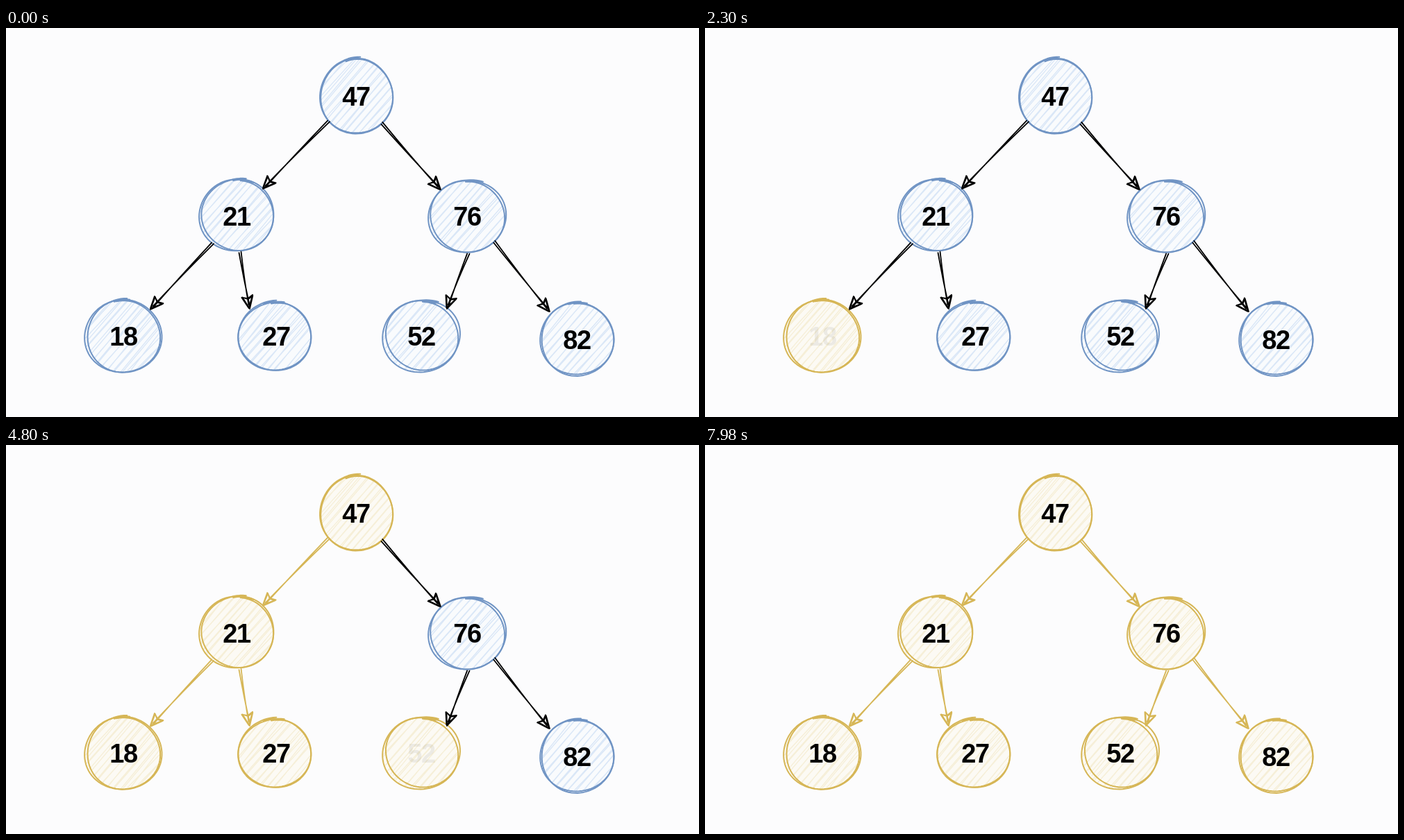
An HTML page with a canvas that plays this animation: 998 px wide and 561 px high, repeating every 8000 ms.

```html
<!DOCTYPE html>
<html lang="en">
<head>
<meta charset="utf-8">
<title>In-order tree traversal</title>
<style>
  html, body { margin: 0; width: 100%; height: 100%; overflow: hidden; background: #fcfcfd; }
  canvas { display: block; }
</style>
</head>
<body>
<canvas id="stage" width="998" height="561"></canvas>
<script>
const ctx = document.getElementById('stage').getContext('2d');
const LOOP = 8000, LABEL_FADE = 500;
const BLUE = { line: '#7094c4', hatch: '#dae7f7', tint: '#f9fbfd' };
const GOLD = { line: '#d6b656', hatch: '#f6efd8', tint: '#fcfaf4' };

// label position, two pen loops as [left, top, right, bottom], visit time
const nodes = [
  { label: '47', x: 504, y: 98, loops: [[452, 44, 557, 152], [453, 45, 557, 153]], at: 4125 },
  { label: '21', x: 332, y: 271, loops: [[278, 219, 385, 322], [282, 218, 386, 321]], at: 2875 },
  { label: '76', x: 664, y: 271, loops: [[608, 221, 718, 324], [611, 219, 720, 323]], at: 5375 },
  { label: '18', x: 169, y: 444, loops: [[113, 393, 222, 497], [117, 392, 224, 497]], at: 2250 },
  { label: '27', x: 389, y: 444, loops: [[334, 395, 439, 494], [335, 396, 440, 494]], at: 3500 },
  { label: '52', x: 598, y: 444, loops: [[542, 394, 651, 497], [547, 392, 654, 493]], at: 4750 },
  { label: '82', x: 822, y: 449, loops: [[769, 397, 875, 500], [771, 396, 875, 502]], at: 6000 }
];
const edges = [
  { from: [465, 134], to: [370, 232], at: 4125 },
  { from: [541, 137], to: [626, 233], at: 7250 },
  { from: [298, 310], to: [208, 406], at: 2875 },
  { from: [337, 323], to: [351, 405], at: 4000 },
  { from: [666, 325], to: [635, 405], at: 5375 },
  { from: [703, 308], to: [783, 409], at: 6500 }
];

function seeded(seed) {
  return () => {
    seed = (seed * 16807) % 2147483647;
    return seed / 2147483647;
  };
}

// A hand-drawn ellipse whose ends overlap near the top.
function penLoop([left, top, right, bottom], random) {
  const path = new Path2D();
  const cx = (left + right) / 2, cy = (top + bottom) / 2;
  const phase = random() * 6, start = -1.9 + random() * 0.5, sweep = 2 * Math.PI + 0.35;
  for (let i = 0; i <= 80; i++) {
    const u = i / 80, a = start + sweep * u;
    const drift = 0.035 * Math.max(0, (u - 0.93) / 0.07) - 0.025 * Math.max(0, 1 - u / 0.07);
    const r = 1 + drift + 0.012 * Math.sin(3 * a + phase);
    path.lineTo(cx + (right - left) / 2 * r * Math.cos(a), cy + (bottom - top) / 2 * r * Math.sin(a));
  }
  return path;
}

function hatching(node, random) {
  const path = new Path2D();
  const dx = Math.cos(0.855), dy = -Math.sin(0.855);
  const jitter = () => (random() - 0.5) * 5;
  for (let offset = -54; offset <= 54; offset += 8.5) {
    const half = Math.sqrt(Math.max(0, 54 * 54 - offset * offset));
    const cx = node.x - dy * offset, cy = node.y + dx * offset;
    for (let pass = 0; pass < 2; pass++) {
      path.moveTo(cx - dx * half + jitter(), cy - dy * half + jitter());
      path.lineTo(cx + dx * half + jitter(), cy + dy * half + jitter());
    }
  }
  return path;
}

function arrow({ from: [x1, y1], to: [x2, y2] }) {
  const path = new Path2D();
  const length = Math.hypot(x2 - x1, y2 - y1);
  const ux = (x2 - x1) / length, uy = (y2 - y1) / length;
  const at = (back, side) => [x2 - ux * back - uy * side, y2 - uy * back + ux * side];
  const bend = (start, middle, end) => {
    path.moveTo(...start);
    path.quadraticCurveTo(...middle, ...end);
  };
  bend(at(length, -1.6), at(length * 0.5, 0.8), at(6, 0.6));
  bend(at(length - 1, 1.6), at(length * 0.5, 1.2), at(6, -0.6));
  for (const wobble of [0, 1.2]) {
    path.moveTo(...at(wobble, wobble));
    path.lineTo(...at(18, 7.5 + wobble));
    path.lineTo(...at(14 + wobble, 0));
    path.lineTo(...at(18 + wobble, -7.5));
    path.closePath();
  }
  return path;
}

nodes.forEach((node, i) => {
  const random = seeded(971 * (i + 3));
  node.outlines = node.loops.map(loop => penLoop(loop, random));
  node.hatch = hatching(node, random);
});
edges.forEach(edge => edge.path = arrow(edge));

function drawNode(node, time) {
  const visited = time >= node.at;
  const color = visited ? GOLD : BLUE;
  ctx.save();
  ctx.clip(node.outlines[0]);
  ctx.fillStyle = color.tint;
  ctx.fill(node.outlines[0]);
  ctx.strokeStyle = color.hatch;
  ctx.lineWidth = 1.4;
  ctx.stroke(node.hatch);
  ctx.restore();

  ctx.strokeStyle = color.line;
  ctx.lineWidth = 2;
  node.outlines.forEach(outline => ctx.stroke(outline));

  ctx.globalAlpha = visited ? Math.min(1, 0.6 * (time - node.at) / LABEL_FADE) : 1;
  if (time - node.at > LABEL_FADE) ctx.globalAlpha = 1;
  ctx.fillStyle = '#000';
  ctx.fillText(node.label, node.x, node.y + 14);
  ctx.globalAlpha = 1;
}

function drawEdge(edge, time) {
  ctx.strokeStyle = time >= edge.at ? GOLD.line : '#000';
  ctx.lineWidth = 1.8;
  ctx.stroke(edge.path);
}

function render(now) {
  const time = now % LOOP;
  ctx.fillStyle = '#fcfcfd';
  ctx.fillRect(0, 0, 998, 561);
  ctx.font = 'bold 38px "Liberation Sans", Arial, sans-serif';
  ctx.letterSpacing = '-1.5px';
  ctx.textAlign = 'center';
  ctx.lineCap = ctx.lineJoin = 'round';
  nodes.forEach(node => drawNode(node, time));
  edges.forEach(edge => drawEdge(edge, time));
  requestAnimationFrame(render);
}
requestAnimationFrame(render);
</script>
</body>
</html>
```
